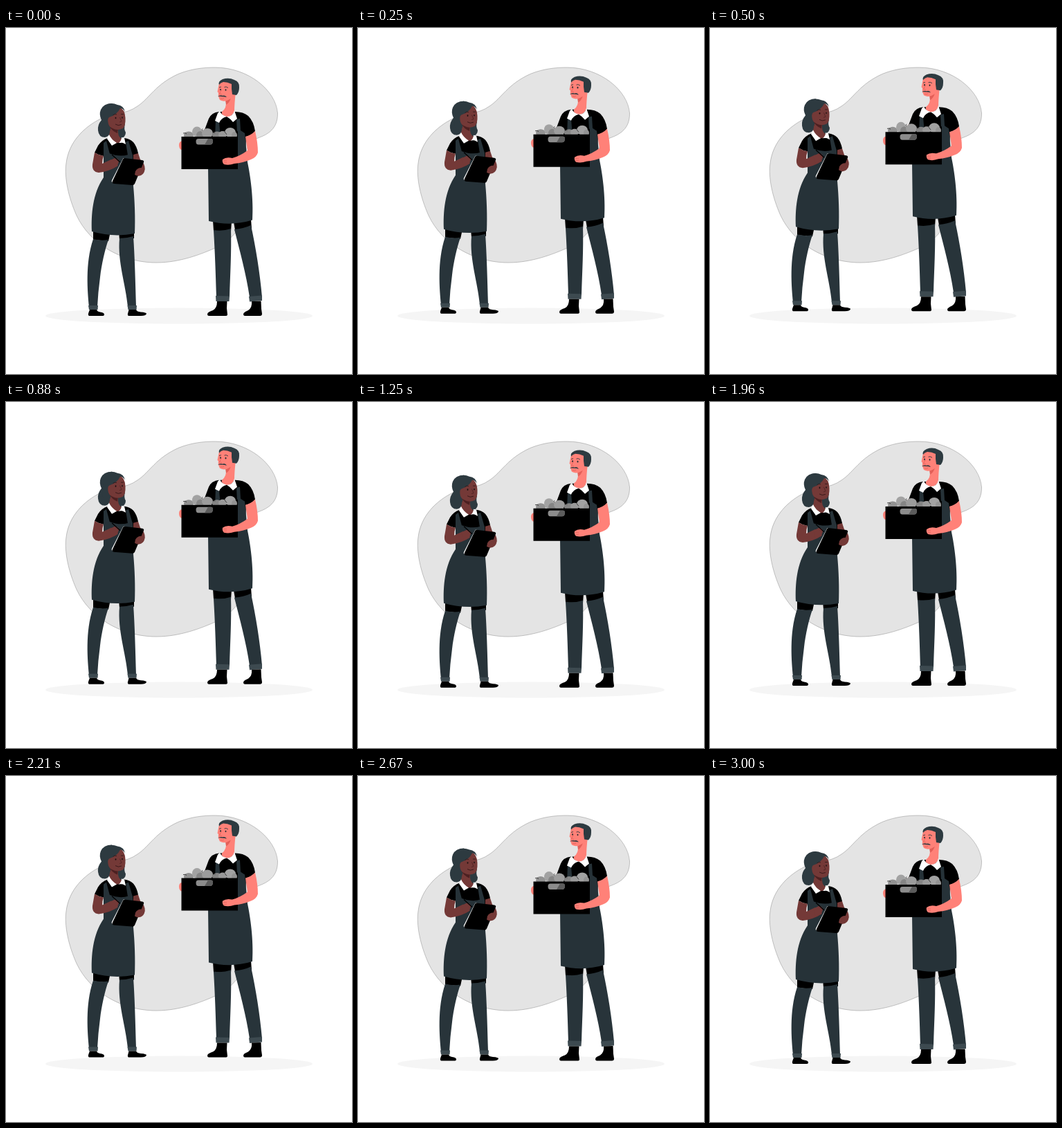
Write an HTML page with a canvas that moves like this. It is 500x500 px and loops after 3.04 s.

```html
<!DOCTYPE html>
<html lang="en">
<head>
<meta charset="utf-8">
<title>Two workers</title>
<style>
html, body { margin: 0; width: 100%; height: 100%; overflow: hidden; background: #fff; }
canvas { display: block; width: 500px; height: 500px; }
</style>
</head>
<body>
<canvas id="stage"></canvas>
<script>
const canvas = document.getElementById('stage');
const ctx = canvas.getContext('2d');
const ratio = window.devicePixelRatio || 1;
canvas.width = canvas.height = 500 * ratio;

const LOOP = 3040, STEP = 1000 / 24, PERIOD = 1500, LIFT = 10;
const BLACK = '#000', APRON = '#263238', CLOTH = '#28343a', CUFF = '#3d4a50', HAIR = '#2d3a40';
const SKIN_W = '#743937', SHADE_W = '#4c2021', SKIN_M = '#ff8178', SHADE_M = '#e35f58';

function fill(color, d) {
  ctx.fillStyle = color;
  ctx.fill(new Path2D(d));
}

function line(color, width, d) {
  ctx.strokeStyle = color;
  ctx.lineWidth = width;
  ctx.stroke(new Path2D(d));
}

function oval(color, x, y, rx, ry = rx) {
  ctx.fillStyle = color;
  ctx.beginPath();
  ctx.ellipse(x, y, rx, ry, 0, 0, Math.PI * 2);
  ctx.fill();
}

function backdrop() {
  const blob = 'M190 113C208 101 216 81 250 66C268 59 285 57 302 57C350 57 390 90 392.500 123' +
    'C393 146 378 154 364 159C338 170 344 200 349 232C352 278 332 304 302 318' +
    'C275 330 245 340 212 339C164 337 121 311 102 271C90 244 84 216 87 195' +
    'C91 164 113 143 137 131C155 123 173 125 190 113Z';
  fill('#e4e4e4', blob);
  line('#808080', 0.45, blob);
  oval('#f5f5f5', 250, 416, 193, 11.5);
}

function womanLegs() {
  fill(BLACK, 'M126 290L151 294L148 308L126 306Z M163 294L185 294L185 304L164 306Z');
  fill(CLOTH, 'M126 305Q137 308 148 306C143 320 138 342 136 360Q133 382 132 403L120 403C118 382 114 340 126 305Z');
  fill(CLOTH, 'M164 304Q174 304 184 301C186 330 187 368 188 403L176 403C173 370 161 338 164 304Z');
  fill(CUFF, 'M119 401L133 401L132.500 407L120 407Z M175.500 401L189 401L188.500 407L176.500 407Z');
  fill(BLACK, 'M121 407L131 407Q132 410 136 410.500Q142 411 142 414Q142 416 139 416L120 416Q118 415 119.500 411Z');
  fill(BLACK, 'M177.500 407L188 407Q189 410 195 410.500Q203 411 203 413Q202 416 195 416L177 416Q175 415 176.500 411Z');
}

function womanBody() {
  fill(SKIN_W, 'M181 180L191 181L194 190L199 196Q203 205 198 210Q191 216 186 212L181 200Z');
  fill(BLACK, 'M147 159Q138 162 133 170L128 180Q134 184 141 185L143 216L183 216L184 183L191 181Q189 171 184 165Q179 160 171 159Z');
  fill(APRON, 'M141 182L149 181Q164 187 177 183L183 183L184 228C186 250 187 275 186 297Q155 303 124 294C123 270 125 239 141 216Z');
  fill(APRON, 'M141 166L145 163L150 182L141 184Z M173 165L177 163L183 184L176 184Z');
  fill(SKIN_W, 'M128 180Q134 184 141 185Q139 190 139 196L152 190L162 199Q150 207 134 209Q124 208 125 197Z');
  fill(HAIR, 'M160 140L172 139Q170 146 173 151Q173 158 165 160L158 154Z');
  fill(SKIN_W, 'M149 142L162 146Q161 157 167 160Q167 166 160 167Q152 164 149 158Z');
  fill('#fff', 'M149 154L146 160L153 170L160 166Q152 161 149 154Z M167 158L171 159L173 168L169 166Q167 165 162 167Q167 163 167 158Z');
  fill(BLACK, 'M160 166L166 166L168 171L157 171Z');
}

function womanHead() {
  fill(HAIR, 'M153 109Q141 109 137 118Q134 125 138 133Q132 140 133 148Q134 158 143 158Q150 157 150 149L158 125Z');
  fill(SHADE_W, 'M149 141L162 146Q161 150 161 152Q153 149 149 141Z');
  fill(SKIN_W, 'M145 124Q149 114 163 114Q172 117 172.500 130Q173 141 169 145Q161 149 154 145Q147 142 144 134Z');
  fill(HAIR, 'M142 114Q150 106 161 111Q170 112 172 121Q169 116 165 116Q161 125 149 129Q146 131 148 139Q152 145 149 152L139 146Z');
  oval('#1c1112', 158.5, 130, 0.9, 1.3);
  oval('#1c1112', 168, 129.5, 0.8, 1.2);
  line('#2b1918', 0.8, 'M154.500 126Q157 123.500 160 125M166 124.500L170 124.500');
  line(SHADE_W, 0.8, 'M164.500 129L167 135L164 136');
  line('#2b1213', 0.8, 'M158 139Q162 142 167 139.500');
}

function womanTablet() {
  fill('#fff', 'M169.500 188L172 188L156 224L153.500 223Q152 222 153 220Z');
  fill(BLACK, 'M171 188L197 191Q200 192 199 194L186 225Q185 227.500 182 227L156 225Q152.500 224 154 221L168.800 190Q169.500 188 171 188Z');
  fill(SKIN_W, 'M187 207Q190 202 195 202L200 203Q201 210 195 213Q190 215 186 212Z');
  fill(SKIN_W, 'M149 192L157 188Q163 188 163 193L161 199L153 203Z');
  line(BLACK, 1.3, 'M153 183L165 194');
}

function manLegs() {
  fill(BLACK, 'M299 278L326 280L325 294L300 293Z M329 280L354 276L355 290L331 292Z');
  fill(CLOTH, 'M300 292Q313 294 325 290C326 323 324 355 323 389L304 389C303 355 302 325 300 292Z');
  fill(CLOTH, 'M330 291Q343 290 354 285C361 318 367 354 370 389L352 389C347 355 338 323 330 291Z');
  fill(CUFF, 'M303 387L323 387.500L322.500 395L303.500 395Z M351 388L370 386.500L370 394L352 395.500Z');
  fill(BLACK, 'M305 395L319.500 395L319 405L320 414Q320 416 317 416L293 416Q290 415 291.500 412Q293 410 299 408Q305 405 305 395Z');
  fill(BLACK, 'M355 395L368.500 394.500L369 406L370 413Q370 416 367 416L345 416Q342 415 343.500 412Q345 410 350 408Q356 404 355 395Z');
}

function manBody() {
  fill(SKIN_M, 'M287 146L297 151L289 164L253 176Q250 174 250 169Q250 164 255 163L275 160Z');
  fill(BLACK, 'M308 121Q297 122 293 131L287 147Q291 152 297 152L297 205L345 205L347 157Q355 155 360 149Q358 135 350 127Q343 121 331 121Z');
  fill(APRON, 'M302 152L345 152L349 194C353 213 358 246 356 277.500Q325 287 293 279L292 200L302 195Z');
  fill(APRON, 'M303 133L308 136L310 158L302 158Z M333 132L338 131L339 148L345 152L346 170L335 170Z');
  fill(BLACK, 'M309 149L335 149L335 158L310 158Z');
  fill(SKIN_M, 'M317 96L332 92Q330 110 330 121Q325 130 317 128Q310 125 312 121Q319 116 318 105Z');
  fill(SHADE_M, 'M317 104Q322 104 325 101Q323 108 318 111Z');
  fill('#fff', 'M309 120L306 123L302 134L308 137Q311 130 319 128Q311 126 309 120Z M330 119L334 131L328 136Q324 131 319 128Q328 128 330 119Z');
}

function manHead() {
  fill(SKIN_M, 'M308 80Q316 74 329 78L331 94Q329 100 323 103Q316 108 309 104Q306 98 307 94L305.500 92Z');
  fill(HAIR, 'M308 82Q306 77 313 74Q322 71 330 75Q338 78 337 86Q337 93 333 97L327 96L326 88L326 81Q320 78 314 78Q310 79 308 82Z');
  oval('#222c31', 310, 89, 0.9, 1.3);
  oval('#222c31', 317.5, 89.5, 0.9, 1.3);
  line(HAIR, 0.9, 'M308 86L311 85M315.500 85.500Q318 84 321 86.500');
  line(SHADE_M, 0.8, 'M311.500 89L308.500 95L312 96');
  fill(HAIR, 'M306 99Q309 96.500 313 97.800Q317 96.500 319 100Q315 99 313 99.200Q309 98.500 306 99Z');
  line(SHADE_M, 0.8, 'M310 102Q313 103 315 101.500');
}

function fruit() {
  oval('#929292', 264, 155, 7, 5.5);
  oval('#a2a2a2', 276, 150, 7, 7.5);
  oval('#858585', 281, 155, 6, 6);
  oval('#9c9c9c', 291, 152, 8, 7);
  oval('#858585', 305, 155, 7, 5.5);
  oval('#999', 313, 154, 6, 5);
  oval('#a2a2a2', 324, 151, 8, 7);
  oval('#939393', 330, 155, 4, 5);
  line('#202020', 0.8, 'M261 153Q260 151 256 152M284 149Q282 147 284 145.500M302 152L300 150M316 150L319 154');
}

function crate() {
  fruit();
  fill(BLACK, 'M253.500 157H335V204H253.500Z');
  fill('#8c8c8c', 'M278 160H296Q299.500 160 299 164Q298.500 168.500 295 168.500H278Q274.500 168.500 274.500 164Q274.500 160 278 160Z');
  fill('#5c5c5c', 'M292 160H296Q299.500 160 299 164Q298.500 168.500 295 168.500H287Z');
  fill(SKIN_M, 'M346 157Q354 155 360 149Q364 166 364 180Q362 187 354 190Q342 195 330 196Q322 199 315 197Q312 194 313 190Q318 186 327 188Q338 185 349 177Z');
  line(SHADE_M, 0.7, 'M314 192L319 192M315 195L319 194.500');
}

function draw(ms) {
  const frame = Math.min(72, Math.floor((ms % LOOP + 4) / STEP));
  const phase = (frame * STEP % PERIOD) / PERIOD;
  const rise = LIFT * (1 - Math.abs(2 * phase - 1));
  ctx.setTransform(ratio, 0, 0, ratio, 0, 0);
  ctx.fillStyle = '#fff';
  ctx.fillRect(0, 0, 500, 500);
  backdrop();
  ctx.translate(0, -rise);
  womanLegs();
  womanBody();
  womanHead();
  womanTablet();
  manLegs();
  manBody();
  manHead();
  crate();
}

const start = performance.now();
function tick() {
  draw(performance.now() - start);
  requestAnimationFrame(tick);
}
tick();
</script>
</body>
</html>
```
